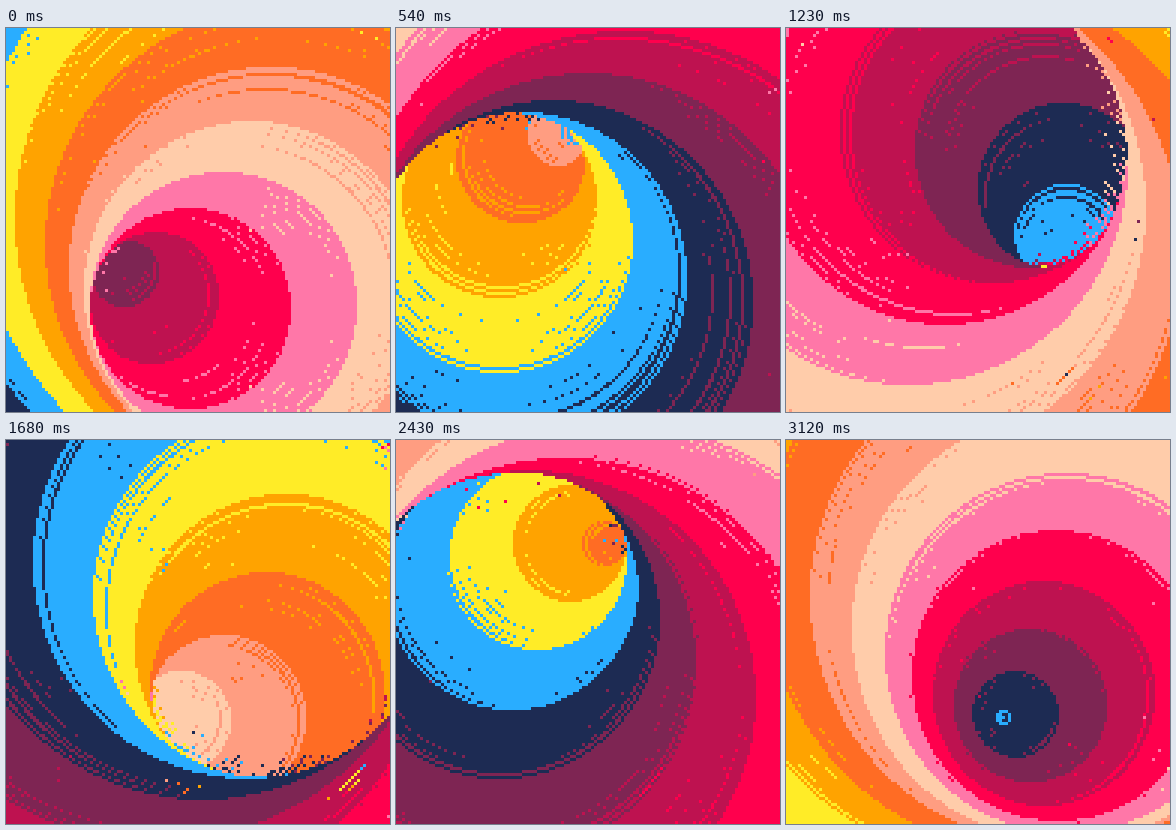
These frames come from a looping animation (384 px wide and 384 px high, 3150 ms). An HTML page with a canvas:

```html
<!DOCTYPE html>
<html lang="en">
<head>
<meta charset="utf-8">
<title>Spiral tunnel</title>
<style>
html, body { margin: 0; width: 100%; height: 100%; overflow: hidden; background: #1d2b53; }
canvas { display: block; width: 100vw; height: 100vh; image-rendering: pixelated; }
</style>
</head>
<body>
<canvas id="stage" width="128" height="128"></canvas>
<script>
const SIZE = 128, FRAMES = 105, FRAME_MS = 30;
const ORBIT = 30, BAND = 11.4, MAX_R = 131, STEP = 0.4;
const TRAIL = 10; // earlier passes that show through the gaps between rings

const palette = ['29adff', '1d2b53', '7e2553', 'be1250', 'ff004d', 'ff77a8',
  'ffccaa', 'ff9d81', 'ff6c24', 'ffa300', 'ffec27'].map(hex => {
  const v = parseInt(hex, 16);
  return (0xff000000 | (v & 255) << 16 | (v & 0xff00) | v >> 16) >>> 0;
});

// Twist of the tunnel over time: [seconds, degrees per unit of radius]
const twistKeys = [[0, 0.79], [0.333, 0.855], [0.9, 0.905], [1.367, 0.897],
  [1.867, 0.87], [2.7, 0.6], [3.467, 0.19]];

function slope(i) {
  const a = twistKeys[Math.max(i - 1, 0)];
  const b = twistKeys[Math.min(i + 1, twistKeys.length - 1)];
  return (b[1] - a[1]) / (b[0] - a[0]);
}

function twist(t) {
  if (t <= 0) return twistKeys[0][1] + slope(0) * t;
  let i = 0;
  while (i < twistKeys.length - 2 && t > twistKeys[i + 1][0]) i++;
  const [t0, v0] = twistKeys[i], [t1, v1] = twistKeys[i + 1];
  const h = t1 - t0, u = (t - t0) / h, w = 1 - u;
  return v0 * (1 + 2 * u) * w * w + v1 * u * u * (3 - 2 * u)
    + h * u * w * (slope(i) * w - slope(i + 1) * u);
}

const ctx = document.getElementById('stage').getContext('2d');
const image = ctx.createImageData(SIZE, SIZE);
const pixels = new Uint32Array(image.data.buffer);

function plot(x, y, color) {
  if (x >= 0 && x < SIZE && y >= 0 && y < SIZE) pixels[y * SIZE + x] = color;
}

function ring(cx, cy, r, color) {
  let x = r, y = 0, d = 1 - r;
  while (x >= y) {
    plot(cx + x, cy + y, color);
    plot(cx - x, cy + y, color);
    plot(cx + x, cy - y, color);
    plot(cx - x, cy - y, color);
    plot(cx + y, cy + x, color);
    plot(cx - y, cy + x, color);
    plot(cx + y, cy - x, color);
    plot(cx - y, cy - x, color);
    y++;
    if (d < 0) d += 2 * y + 1;
    else { x--; d += 2 * (y - x) + 1; }
  }
}

function drawTunnel(n) {
  const t = n / 30, k = twist(t), bend = 0.0004 * t - 0.0006;
  const phase = 0.33 * n - 0.97;
  for (let r = 0; r < MAX_R; r += STEP) {
    const q = 3 * r;
    const a = (171.5 + 6 * n - q * (k + bend * q)) * Math.PI / 180;
    const band = Math.ceil(r / BAND - phase) % 11;
    ring(Math.floor(64 + ORBIT * Math.cos(a)), Math.floor(64 + ORBIT * Math.sin(a)),
      Math.floor(r), palette[(band + 11) % 11]);
  }
}

function render(n) {
  pixels.fill(palette[1]);
  for (let i = n - TRAIL; i <= n; i++) drawTunnel(i);
  ctx.putImageData(image, 0, 0);
}

const start = performance.now();
let shown = -1;

function tick() {
  const n = Math.floor((performance.now() - start) / FRAME_MS) % FRAMES;
  if (n !== shown) render(shown = n);
  requestAnimationFrame(tick);
}
tick();
</script>
</body>
</html>
```
